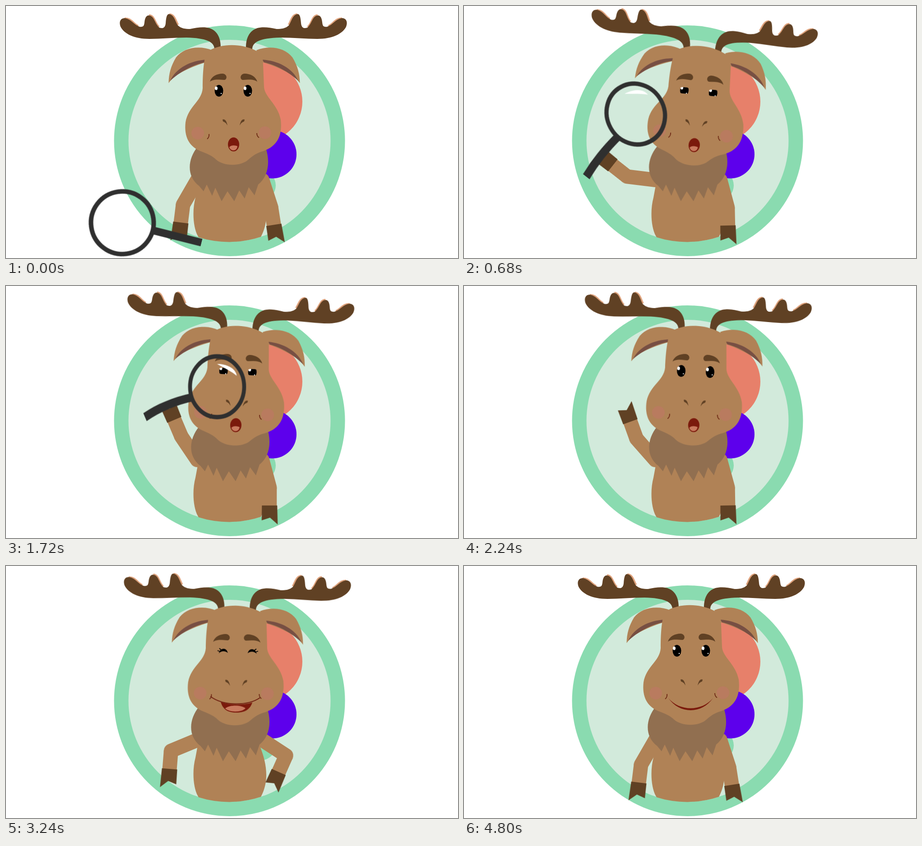
Write an HTML page without scripts that moves like this. It is 1002 by 559 pixels and loops after 4840 ms.

```html
<!DOCTYPE html>
<html lang="en">
<head>
<meta charset="utf-8">
<title>Moose with a magnifying glass</title>
<style>
  html, body { margin: 0; width: 100%; height: 100%; overflow: hidden; background: #fff; }
  svg { display: block; width: 100%; height: 100%; }

  .skin { fill: #b08256; }
  .dark { fill: #604124; }
  .lip { fill: #7b1a0c; }
  .limb { fill: none; stroke: #b08256; }

  [class^="a-"] { animation: 4840ms cubic-bezier(.4, .2, .6, .8) infinite; }
  .a-head { animation-name: head; animation-timing-function: ease-in-out; transform-origin: 490px 371px; }
  .a-ruff { animation-name: ruff; }
  .a-lup { animation-name: lup; }
  .a-lfore { animation-name: lfore; }
  .a-rup { animation-name: rup; }
  .a-rfore { animation-name: rfore; }
  .a-grip { animation-name: grip; }
  .a-ring { animation-name: ring; }
  .a-handle { animation-name: bend; fill: #2f2f2f; }

  /* poses that swap without blending */
  [class^="s-"] { animation: 4840ms step-end infinite; }
  .s-glass { animation-name: glass; }
  .s-open { animation-name: open; }
  .s-squint { animation-name: squint; }
  .s-happy { animation-name: happy; }
  .s-oh { animation-name: oh; }
  .s-smile { animation-name: smile; }

  @keyframes head {
    0%, 99.2%, 100% { transform: translate(0, 0) rotate(0deg); }
    0% { animation-timing-function: cubic-bezier(.4, .2, .7, .8); }
    6.61% { transform: translate(0, .2px) rotate(4.2deg); animation-timing-function: ease-out; }
    11.8% { transform: translate(0, 0) rotate(5.4deg); }
    21.5%, 44.8% { transform: translate(2.2px, 1px) rotate(2.5deg); }
    53.5%, 62.3%, 71.1%, 80%, 88.8% { transform: translate(4px, 1px) rotate(-1.4deg); }
    57.9%, 66.7%, 75.5%, 84.4%, 93.2% { transform: translate(4px, 1px) rotate(.9deg); }
  }
  @keyframes ruff {
    0%, 99.2%, 100% { transform: translateX(0); }
    6.61% { transform: translateX(2px); }
    18%, 93% { transform: translateX(3px); }
  }
  @keyframes lup {
    0%, 98.8%, 100% { transform: rotate(30deg); }
    6.61% { transform: rotate(35deg); }
    11.57% { transform: rotate(75deg); }
    18.2% { transform: rotate(140deg); }
    21.5% { transform: rotate(142deg); }
    35.5% { transform: rotate(146deg); }
    45.4% { transform: rotate(142deg); }
    48.8%, 61.2% { transform: rotate(126deg); }
    68.6%, 91.7% { transform: rotate(56deg); }
  }
  @keyframes lfore {
    0%, 98.8%, 100% { transform: rotate(-23deg); }
    6.61% { transform: rotate(31deg); }
    11.57% { transform: rotate(40deg); }
    18.2% { transform: rotate(14deg); }
    21.5% { transform: rotate(12deg); }
    35.5% { transform: rotate(11deg); }
    45.4% { transform: rotate(14deg); }
    48.8% { transform: rotate(50deg); }
    54.5% { transform: rotate(39deg); }
    57.9% { transform: rotate(25deg); }
    61.2% { transform: rotate(40deg); }
    68.6%, 91.7% { transform: rotate(-83deg); }
  }
  @keyframes rup {
    0%, 54%, 60%, 98.8%, 100% { transform: rotate(18deg); }
    6.61%, 44.8% { transform: rotate(15deg); }
    68.6%, 91.7% { transform: rotate(63deg); }
  }
  @keyframes rfore {
    0%, 54%, 60%, 98.8%, 100% { transform: rotate(-9deg); }
    6.61% { transform: rotate(-11deg); }
    18.2%, 44.8% { transform: rotate(-15deg); }
    68.6%, 91.7% { transform: rotate(-92deg); }
  }
  @keyframes grip {
    0% { transform: translate(-128.6px, 56.5px) rotate(7deg); }
    6.61% { transform: translate(-123px, 79px) rotate(-3deg); }
    21.5% { transform: translate(-118.6px, 62.2px) rotate(3deg) scale(.97); }
    35.5%, 100% { transform: translate(-116px, 70.6px) rotate(0deg) scale(.97); }
  }
  @keyframes ring {
    0%, 6.61% { transform: rotate(-157deg) scale(1, 1); }
    19%, 100% { transform: rotate(-157deg) scale(.89, 1); }
  }
  @keyframes bend {
    0%, 6.61% { d: path("M66,-8.5Q123,-8.5 181,-8.5V8.5Q123,8.5 66,8.5Z"); }
    19%, 100% { d: path("M62,-9.5Q123,2 179,-9.5V10Q123,21 62,9.5Z"); }
  }
  @keyframes glass { 0% { opacity: 1; } 45.4%, 100% { opacity: 0; } }
  @keyframes open { 0%, 45.4%, 93% { opacity: 1; } 13.2%, 59.5% { opacity: 0; } }
  @keyframes squint { 0%, 45.4%, 100% { opacity: 0; } 13.2% { opacity: 1; } }
  @keyframes happy { 0%, 93%, 100% { opacity: 0; } 59.5% { opacity: 1; } }
  @keyframes oh { 0% { opacity: 1; } 59.5%, 100% { opacity: 0; } }
  @keyframes smile { 0% { opacity: 0; } 93%, 100% { opacity: 1; } }
</style>
</head>
<body>
<svg viewBox="0 0 1002 559">
  <defs>
    <path id="upper" class="limb" stroke-width="32" stroke-linecap="round" d="M0,0V63"/>
    <g id="fore">
      <path class="limb" stroke-width="32" d="M0,0V43"/>
      <path class="dark" d="M-17,40L17,40L17.5,73L-1,67L-18,82Z"/>
    </g>
    <g id="antler">
      <path fill="none" stroke="#dfa27c" stroke-width="5" d="M263,28C277,27 282,40 293,45M317,21C329,21 330,40 339,47M362,19C374,19 376,34 381,42"/>
      <path class="dark" d="M462,97C463,80 445,71 400,70C370,70 345,73 318,73C285,73 262,62 254,46C249,33 256,26 264,27C277,29 284,42 296,46C305,47 306,44 307,36C308,25 312,20 317,21C329,22 330,40 340,48C348,51 353,48 354,38C355,24 357,18 361,18C373,19 375,34 381,43C388,50 398,51 408,51C425,47 440,46 451,49C468,55 477,70 476,97Z"/>
    </g>
    <g id="ear">
      <path class="skin" d="M457,98C430,87 394,91 377,114C365,134 361,150 360.5,171C375,150 410,135 446,124Z"/>
      <path fill="#774f43" d="M364,166C377,137 410,121 444,119L440,125C415,130 385,146 364,166Z"/>
    </g>
    <path id="brow" class="dark" d="M452,168C455,156 468,150 480,150C491,151 491,163 484,164C472,164 462,161 452,168Z"/>
    <path id="nostril" class="dark" d="M480,252C486,250 489,256 491,265C487,258 485,258 481,256Z"/>
    <g id="eye">
      <ellipse rx="9.5" ry="13"/>
      <ellipse cx="-6" cy="-5.5" rx="3" ry="4" fill="#fff"/>
      <circle cx="5" cy="6" r="1.2" fill="#fff"/>
    </g>
    <g id="eyes">
      <use href="#eye" x="472" y="188"/>
      <use href="#eye" x="536" y="188"/>
    </g>
    <g id="wink">
      <path d="M465,193C468,180 482,179 485,192C479,187 471,187 465,193Z"/>
      <path fill="none" stroke="#000" stroke-width="1.8" d="M468,189L462,187M471,186L466,182"/>
    </g>
    <clipPath id="slit">
      <rect x="461" y="181" width="22" height="14" rx="6"/>
      <rect x="525" y="181" width="22" height="14" rx="6"/>
    </clipPath>
  </defs>

  <circle cx="495.5" cy="299" r="256" fill="#8adbb0"/>
  <circle cx="495.5" cy="299" r="224" fill="#d2eadb"/>
  <circle cx="568.5" cy="212" r="88.5" fill="#e7806a"/>
  <circle cx="565" cy="398" r="33" fill="#8adbb0"/>
  <circle cx="590.5" cy="329" r="53.5" fill="#5d00ec"/>

  <path class="skin" d="M427,513C415,495 412,455 420,425L432,360H560L563,400C577,435 585,475 565,512A224,224 0 0 1 427,513Z"/>

  <g transform="translate(424 386)">
    <g class="a-lup">
      <use href="#upper"/>
      <g transform="translate(0 63)"><g class="a-lfore"><use href="#fore"/></g></g>
    </g>
  </g>
  <g transform="translate(568 386) scale(-1 1)">
    <g class="a-rup">
      <use href="#upper"/>
      <g transform="translate(0 63)"><g class="a-rfore"><use href="#fore"/></g></g>
    </g>
  </g>

  <g class="a-ruff">
    <path fill="#916f50" d="M425,312C402,340 400,378 428,399L438,411L445,396L457,421L464,403L478,433L491,411L506,433L517,409L529,427L538,402L551,420L559,396C579,380 588,350 575,312Z"/>
  </g>

  <g class="a-head">
    <use href="#antler"/>
    <use href="#antler" transform="translate(1008 0) scale(-1 1)"/>
    <use href="#ear"/>
    <use href="#ear" transform="translate(1012 0) scale(-1 1)"/>
    <path class="skin" d="M452,98C480,83 520,83 552,98C566,104 570,112 570,130L572,180C574,203 602,217 609,252C613,287 602,311 570,322C556,326 548,331 537,341C520,356 484,356 466,341C456,331 446,328 434,323C402,311 395,285 398,258C404,222 434,212 436,182C436,150 438,130 441,115Z"/>
    <use href="#brow"/>
    <use href="#brow" transform="translate(1009 0) scale(-1 1)"/>
    <use href="#nostril"/>
    <use href="#nostril" transform="translate(1009 0) scale(-1 1)"/>
    <circle cx="425" cy="282" r="14" fill="#b97b5f"/>
    <circle cx="574" cy="281" r="14" fill="#b97b5f"/>
    <path fill="none" stroke="#6b2512" stroke-width="1.8" d="M450,284Q451,291 446,295M556,282Q556,289 561,292"/>

    <g class="s-open"><use href="#eyes"/></g>
    <g class="s-squint"><use href="#eyes" clip-path="url(#slit)"/></g>
    <g class="s-happy">
      <use href="#wink"/>
      <use href="#wink" transform="translate(1014 0) scale(-1 1)"/>
    </g>

    <g class="s-oh">
      <ellipse class="lip" cx="504.5" cy="307" rx="12.5" ry="15.5"/>
      <path fill="#c87a5e" d="M495,313C500,308 508,309 513,311C512,323 498,323 495,313Z"/>
    </g>
    <g class="s-happy">
      <path class="lip" d="M471,301C490,307 520,308 541,301C536,318 522,324 505,324C488,324 476,318 471,301Z"/>
      <path fill="#c87a5e" d="M481,315C492,306 517,307 526,314C518,324 490,324 481,315Z"/>
      <path fill="none" stroke="#6b1a0c" stroke-width="2" d="M448,289C475,309 530,310 558,290"/>
    </g>
    <g class="s-smile">
      <path class="lip" d="M453,293C478,329 527,329 552,293C527,323 478,323 453,293Z"/>
    </g>
  </g>

  <g transform="translate(424 386)">
    <g class="a-lup">
      <g transform="translate(0 63)">
        <g class="a-lfore">
          <g class="a-grip">
            <g class="s-glass">
              <path class="a-handle" d="M66,-8.5Q123,-8.5 181,-8.5V8.5Q123,8.5 66,8.5Z"/>
              <g class="a-ring">
                <circle r="69.5" fill="none" stroke="#2f2f2f" stroke-width="10"/>
              </g>
              <g class="s-squint">
                <path fill="#fff" transform="rotate(-157)" d="M0,-52C20,-52 42,-44 45,-25C33,-35 18,-42 0,-52Z"/>
              </g>
            </g>
          </g>
        </g>
      </g>
    </g>
  </g>
</svg>
</body>
</html>
```
